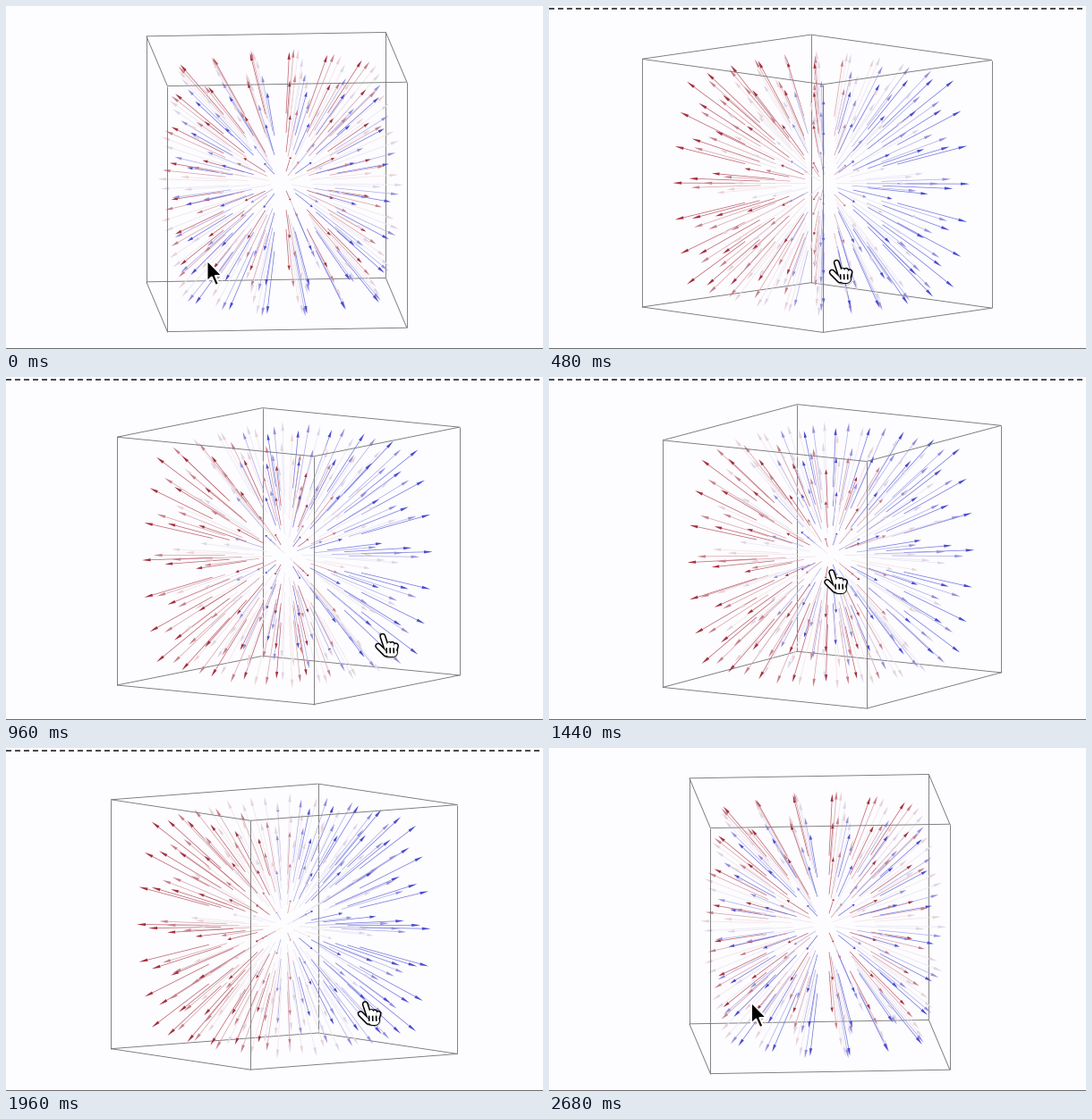
A matplotlib script that plays this animation: 600x384 px, repeating every 2720 ms.

```python
import numpy as np
import matplotlib.pyplot as plt
from matplotlib.animation import FuncAnimation
from matplotlib.collections import LineCollection, PolyCollection
from matplotlib.colors import LinearSegmentedColormap
from matplotlib.patches import Polygon, Rectangle

W, H, DPI = 600, 384, 100
PX = 72 / DPI
FRAMES, STEP = 68, 40
PIVOT = np.array([312.3, 198.2])

# pointer path: step, x, y
PATH = np.array([(0, 224, 284), (8, 280, 285), (12, 320.5, 284), (19, 400.5, 283.5),
                 (24, 420, 287), (26, 423, 288), (34, 295, 202)])
GRAB, LET_GO = PATH[1], PATH[5]


def pointer(t):
    """Monotone cubic along the pointer path."""
    ts, v = PATH[:, 0], PATH[:, 1:]
    d = np.diff(v, axis=0) / np.diff(ts)[:, None]
    a, b = d[:-1], d[1:]
    turn = a * b <= 0
    m = np.zeros_like(v)
    m[1:-1] = np.where(turn, 0, 2 * a * b / np.where(turn, 1, a + b))
    i = min(np.searchsorted(ts, t, side="right") - 1, len(ts) - 2)
    h = ts[i + 1] - ts[i]
    u = (t - ts[i]) / h
    return ((1 + 2 * u) * (1 - u) ** 2 * v[i] + u * (1 - u) ** 2 * h * m[i]
            + u * u * (3 - 2 * u) * v[i + 1] + u * u * (u - 1) * h * m[i + 1])


def view(t):
    """The drag turns the box one degree per pixel and dips the camera."""
    x = pointer(min(t, LET_GO[0]))[0]
    p = np.clip((x - GRAB[1]) / (LET_GO[1] - GRAB[1]), 0, 1)
    azimuth = 4.75 + 143.3 * p
    elevation = 11.36 - 1.76 * p - 11.1 * p * np.sqrt(1 - p)
    return np.radians(azimuth), np.radians(elevation)


def project(p, az, el):
    """Orthographic view of (c, o, z) points: screen points and depth."""
    c, o, z = np.moveaxis(p, -1, 0)
    x = c * np.sin(az) + o * np.cos(az)
    d = c * np.cos(az) - o * np.sin(az)
    y = d * np.sin(el) - z * np.cos(el)
    depth = d * np.cos(el) + z * np.sin(el)
    return np.stack([x, y], -1) + PIVOT, depth


# radial field of equally long arrows
side = 24.4 * (np.arange(6) - 2.6)
rise = 22 * np.arange(-3, 4)
grid = np.array(np.meshgrid(side, side, rise, indexing="ij")).reshape(3, -1).T
unit = grid / np.linalg.norm(grid, axis=1, keepdims=True)


def along(length):
    return (grid + length * unit) * (1.0125, 0.957, 1) + (-4, -3.5, 0)


tails, necks, tips = along(0), along(72), along(82)
shade = (grid[:, 0] - side[0]) / (side[-1] - side[0])


def diverging(red, blue, mid="#f8f4f6"):
    stops = [(0, red), (0.45, mid), (0.55, mid), (1, blue)]
    return LinearSegmentedColormap.from_list("field", stops)


shaft_rgb = diverging("#bd6470", "#7378e0")(shade)
head_rgb = diverging("#a5303f", "#4a4cd0", "#efe6ea")(shade)

# box: centre plus or minus half its size
signs = np.array([[c, o, z] for c in (-1, 1) for o in (-1, 1) for z in (-1, 1)])
corners = signs * (142, 134.2, 140.25) + (-9.3, -9.7, 0)
edges = [(i, i | b) for i in range(8) for b in (1, 2, 4) if not i & b]

fig = plt.figure(figsize=(W / DPI, H / DPI), dpi=DPI, facecolor="#fdfcfe")
ax = fig.add_axes([0, 0, 1, 1])
ax.set_xlim(-0.5, W - 0.5)
ax.set_ylim(H - 0.5, -0.5)
ax.axis("off")


def lines(z, width, **kw):
    return ax.add_collection(LineCollection([], linewidths=width * PX, zorder=z, **kw))


back = lines(1, 0.9, colors="#777777")
shafts = lines(2, 0.75)
heads = ax.add_collection(PolyCollection([], linewidths=0, zorder=3))
front = lines(4, 0.9, colors="#777777")

ax.add_patch(Rectangle((-1, H - 1.5), W + 1, 2, fc="#6c6c6c", lw=0, zorder=5))
dashes = ax.add_collection(PolyCollection(
    [[(x, 1.5), (x + 6, 1.5), (x + 6, 3.5), (x, 3.5)] for x in np.arange(-0.5, W, 10)],
    facecolors="#4a4a4a", linewidths=0, zorder=5))

# arrow pointer, relative to its tip
ARROW = np.array([(0, 0), (0, 24), (5.3, 19), (9.6, 28.5), (13.4, 26.8),
                  (9.4, 17.6), (17, 17.3)])
arrow = ax.add_patch(Polygon(ARROW, fc="black", ec="white", lw=2 * PX,
                             joinstyle="round", zorder=7))

# hand pointer: round strokes for index finger, thumb, palm and knuckles
HAND = np.array([[(0.3, 2.7), (5, 17)], [(-4.8, 13.6), (4, 22.5)], [(7.5, 20.8), (11, 20.8)]]
                + [[(7 + 4 * k, 11.3 + k * k / 2), (7 + 3 * k, 20)] for k in range(3)])
GIRTH = np.array([4, 4, 9] + [4] * 3)
CREASES = np.array([[(4.6 + 4 * k, 15.7), (4.8 + 4 * k, 21.8)] for k in range(3)])
hand_parts = [
    (lines(6, GIRTH + 3, colors="black", alpha=0.15, capstyle="round"), HAND + (0.8, 1.6)),
    (lines(7, GIRTH + 3, colors="black", capstyle="round"), HAND),
    (lines(8, GIRTH, colors="white", capstyle="round"), HAND),
    (lines(9, 1.6, colors="black"), CREASES),
]


def draw_box(az, el):
    pts, depth = project(corners, az, el)
    far = np.argmin(depth)
    back.set_segments([pts[list(e)] for e in edges if far in e])
    front.set_segments([pts[list(e)] for e in edges if far not in e])


def draw_field(az, el):
    a, _ = project(tails, az, el)
    n, depth = project(necks, az, el)
    t, _ = project(tips, az, el)
    run = t - n
    across = np.stack([-run[:, 1], run[:, 0]], -1)
    across *= 1.6 / np.maximum(np.linalg.norm(run, axis=1, keepdims=True), 1e-6)
    order = np.argsort(depth)
    shafts.set_segments(np.stack([a, n], 1)[order])
    shafts.set_color(shaft_rgb[order])
    heads.set_verts(np.stack([t, n + across, n - across], 1)[order])
    heads.set_facecolor(head_rgb[order])


def draw_pointer(spot, held):
    arrow.set_visible(not held)
    arrow.set_xy(ARROW + spot)
    for part, segments in hand_parts:
        part.set_visible(held)
        part.set_segments(segments + spot)


def update(frame):
    t = min(frame, FRAMES - frame)      # out and back again
    held = t >= GRAB[0]
    dashes.set_visible(held)
    draw_box(*view(t))
    draw_field(*view(t))
    draw_pointer(pointer(t), held)
    return []


anim = FuncAnimation(fig, update, frames=FRAMES, interval=STEP,
                     repeat=True, repeat_delay=0, blit=False)
plt.show()
```
